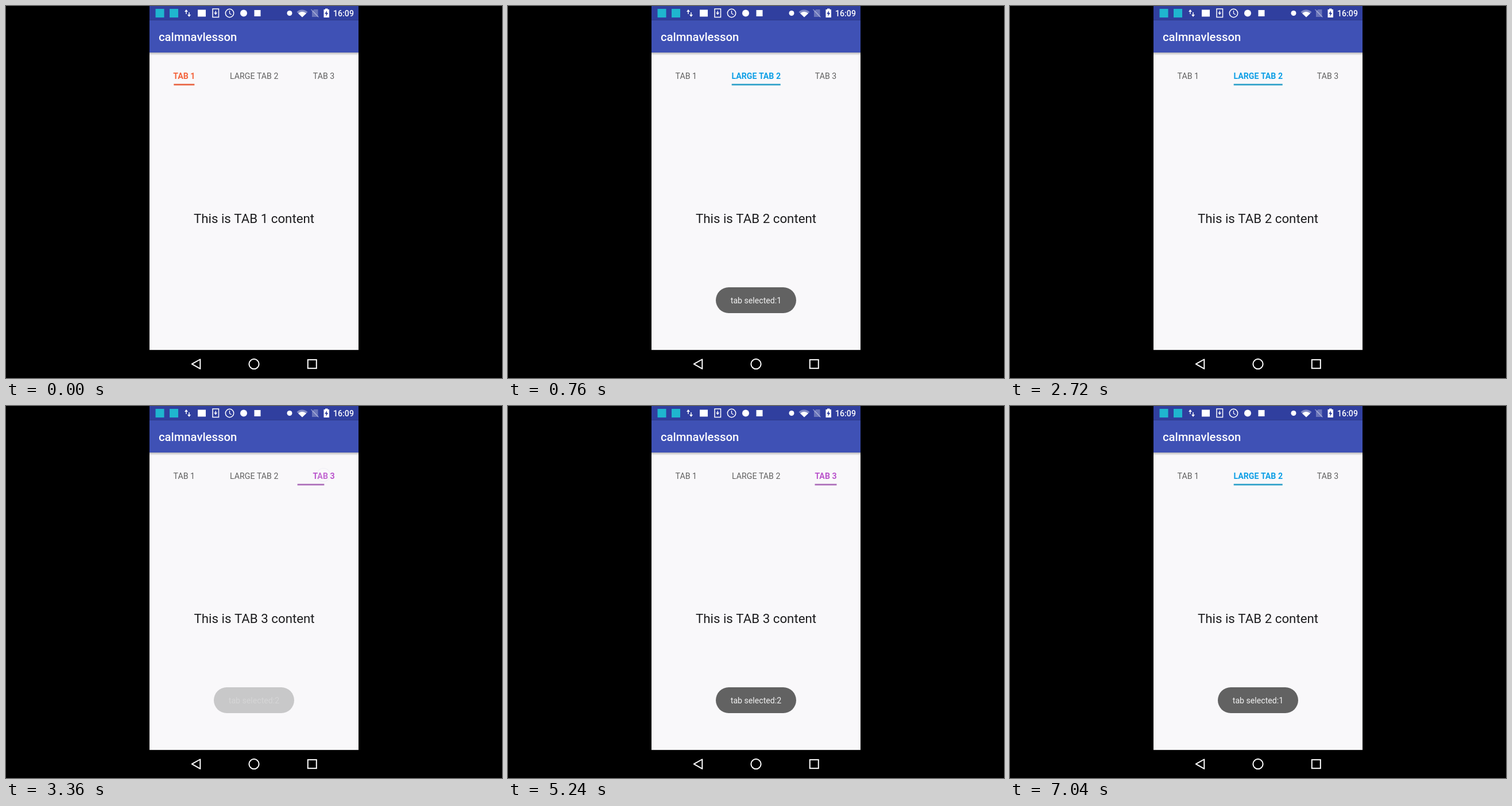
Write an HTML page with a canvas that moves like this. It is 864 px wide and 648 px high and loops after 8 s.

```html
<!DOCTYPE html>
<html lang="en">
<head>
<meta charset="utf-8">
<title>Tabs</title>
<style>
html, body { margin: 0; width: 100%; height: 100%; overflow: hidden; background: #000; }
canvas { display: block; width: 864px; height: 648px; }
</style>
</head>
<body>
<canvas id="stage" width="864" height="648"></canvas>
<script>
const ctx = document.getElementById('stage').getContext('2d');
const LOOP = 8000, STEP = 40;
// A 360 x 640 dp screen, centred on the stage.
const DP = 648 / 640, WIDTH = 360 * DP, LEFT = 432 - WIDTH / 2;
const STATUS = 24 * DP, BAR = 80 * DP, NAV = 592 * DP;
const PRESS = 120, SLIDE = 300, PAGE = 220;

const tabs = [
  { label: 'TAB 1', x: 310.3, width: 36, text: '#f4643c', line: '#e8623f' },
  { label: 'LARGE TAB 2', x: 432.2, width: 85, text: '#0d9fe6', line: '#2a9fc8' },
  { label: 'TAB 3', x: 553.5, width: 38, text: '#ba55cc', line: '#ab6cb8' }
];

const taps = [
  { at: 40, from: 0, to: 1, x: 430, y: 119, hide: 2130, gone: 2710 },
  { at: 3080, from: 1, to: 2, x: 553, y: 120, hide: 5210, gone: 5710 },
  { at: 6320, from: 2, to: 1, x: 414, y: 116, hide: 9000, gone: 9500 }
];

const clamp = v => Math.max(0, Math.min(1, v));
const mix = (a, b, k) => a + (b - a) * k;
const decelerate = (k, power) => 1 - (1 - k) ** power;
const font = (size, weight = 400) => `${weight} ${size * DP}px Roboto, sans-serif`;

// Cubic curve with control points (0.4, 0) and (0.2, 1).
function fastOutSlowIn(k) {
  let lo = 0, hi = 1, s = 0.5;
  for (let i = 0; i < 16; i++) {
    s = (lo + hi) / 2;
    const x = 1.2 * s * (1 - s) ** 2 + 0.6 * s * s * (1 - s) + s ** 3;
    if (x < k) lo = s; else hi = s;
  }
  return s * s * (3 - 2 * s);
}

function rect(x, y, w, h, color) {
  ctx.fillStyle = color;
  ctx.fillRect(x, y, w, h);
}

function text(str, x, y, face, color, align = 'center') {
  ctx.font = face;
  ctx.fillStyle = color;
  ctx.textAlign = align;
  ctx.fillText(str, x, y);
}

function polygon(points, color) {
  ctx.beginPath();
  points.forEach(([x, y]) => ctx.lineTo(x, y));
  ctx.closePath();
  ctx.fillStyle = color;
  ctx.fill();
}

function stroke(points, width, color = '#fff', closed = false) {
  ctx.beginPath();
  points.forEach(([x, y]) => ctx.lineTo(x, y));
  if (closed) ctx.closePath();
  ctx.lineWidth = width;
  ctx.strokeStyle = color;
  ctx.stroke();
}

function circle(x, y, r, fill, line, width = 1) {
  ctx.beginPath();
  ctx.arc(x, y, r, 0, Math.PI * 2);
  if (fill) { ctx.fillStyle = fill; ctx.fill(); }
  if (line) { ctx.strokeStyle = line; ctx.lineWidth = width; ctx.stroke(); }
}

function arrow(x, tail, tip) {
  const dir = Math.sign(tip - tail);
  stroke([[x, tail], [x, tip]], 1.4);
  polygon([[x - 3, tip - dir * 3], [x + 3, tip - dir * 3], [x, tip + dir]], '#fff');
}

function wedge(r, color) {
  ctx.beginPath();
  ctx.moveTo(516, 19.5);
  ctx.arc(516, 19.5, r, -Math.PI * 0.76, -Math.PI * 0.24);
  ctx.closePath();
  ctx.fillStyle = color;
  ctx.fill();
}

function statusBar() {
  rect(LEFT, 0, WIDTH, STATUS, '#303f9f');
  rect(260.5, 5, 15, 15, '#1fb5cf');
  rect(285, 5, 15, 15, '#1fb5cf');
  arrow(314, 14, 7);
  arrow(319, 11, 18);
  rect(334, 6.5, 14, 12, '#fff');
  ctx.strokeStyle = '#fff';
  ctx.lineWidth = 1.5;
  ctx.strokeRect(360, 5, 10.5, 14.5);
  arrow(365.2, 8.5, 14.5);
  circle(389.5, 12.5, 7.2, null, '#fff', 1.5);
  stroke([[389.5, 8], [389.5, 13], [392.7, 15]], 1.3);
  circle(414, 12.5, 6, '#fff');
  rect(432.5, 7, 11, 11, '#fff');
  circle(494, 12.5, 4.5, '#fff');
  wedge(13, 'rgba(255,255,255,.4)');
  wedge(9.5, '#fff');
  polygon([[536.5, 6], [543.5, 6], [543.5, 19], [533, 19], [533, 9.5]], 'rgba(255,255,255,.28)');
  stroke([[531.5, 6], [544.5, 19.5]], 1.3, 'rgba(255,255,255,.45)');
  rect(556, 4.5, 4.5, 2, '#fff');
  rect(553.5, 6, 9.5, 14, '#fff');
  polygon([[559, 8], [555.2, 13.8], [557.7, 13.8], [557.3, 18], [561.2, 12], [558.8, 12]], '#303f9f');
  text('16:09', 570, 17.7, font(14, 500), '#fff', 'left');
}

function appBar() {
  const shadow = ctx.createLinearGradient(0, BAR, 0, BAR + 5);
  shadow.addColorStop(0, 'rgba(0,0,0,.26)');
  shadow.addColorStop(1, 'rgba(0,0,0,0)');
  rect(LEFT, BAR, WIDTH, 5, shadow);
  rect(LEFT, STATUS, WIDTH, BAR - STATUS, '#3f51b5');
  text('calmnavlesson', LEFT + 16 * DP, 60.8, font(20, 500), '#fff', 'left');
}

function navBar() {
  const y = (NAV + 648) / 2;
  rect(LEFT, NAV, WIDTH, 648 - NAV, '#000');
  ctx.lineJoin = 'round';
  stroke([[338.3, y - 8.2], [338.3, y + 8.2], [323.8, y]], 2, '#fff', true);
  ctx.lineJoin = 'miter';
  circle(432, y, 8.6, null, '#fff', 2);
  ctx.strokeRect(525.8, y - 7.5, 15, 15);
}

function tabRow(selected, from, k) {
  tabs.forEach((tab, i) => {
    const on = i === selected;
    text(tab.label, tab.x, 126.5, font(14, on ? 700 : 400), on ? tab.text : '#606060');
  });
  const a = tabs[from], b = tabs[selected];
  const width = mix(a.width, b.width, k);
  rect(mix(a.x, b.x, k) - width / 2, 135.6, width, 2.7, b.line);
}

function pages(position) {
  tabs.forEach((tab, i) => {
    const offset = (i - position) * WIDTH;
    if (Math.abs(offset) < WIDTH)
      text(`This is TAB ${i + 1} content`, 432 + offset, 378, font(22), '#1c1c1e');
  });
}

function toast(tap, t) {
  const shown = decelerate(clamp((t - tap.at - 190) / 510), 2);
  const hidden = clamp((t - tap.hide) / (tap.gone - tap.hide)) ** 2;
  ctx.globalAlpha = shown * (1 - hidden);
  ctx.beginPath();
  ctx.roundRect(362, 490, 140, 45, 22.5);
  ctx.fillStyle = '#626262';
  ctx.fill();
  text('tab selected:' + tap.to, 432, 518, font(14), '#f2f2f2');
  ctx.globalAlpha = 1;
}

function touch(tap, t) {
  const age = t - tap.at;
  if (age < 0) return;
  ctx.globalAlpha = 1 - clamp((age - PRESS) / 200);
  circle(tap.x, tap.y, 11.5, 'rgba(250,250,255,.6)', 'rgba(150,150,190,.5)', 1.2);
  ctx.globalAlpha = 1;
}

function draw(t) {
  const tap = taps.filter(p => p.at <= t).pop() || taps[0];
  const age = t - tap.at - PRESS;
  const selected = age >= 0 ? tap.to : tap.from;
  const page = decelerate(clamp(age / PAGE), 5);

  rect(0, 0, 864, 648, '#000');
  ctx.save();
  ctx.beginPath();
  ctx.rect(LEFT, 0, WIDTH, 648);
  ctx.clip();
  rect(LEFT, BAR, WIDTH, NAV - BAR, '#f9f8fa');
  pages(mix(tap.from, tap.to, page));
  tabRow(selected, tap.from, fastOutSlowIn(clamp(age / SLIDE)));
  appBar();
  statusBar();
  navBar();
  toast(tap, t);
  touch(tap, t);
  ctx.restore();
}

const start = performance.now();
function frame() {
  const t = (performance.now() - start) % LOOP;
  draw(Math.floor(t / STEP) * STEP);
  requestAnimationFrame(frame);
}
frame();
</script>
</body>
</html>
```
